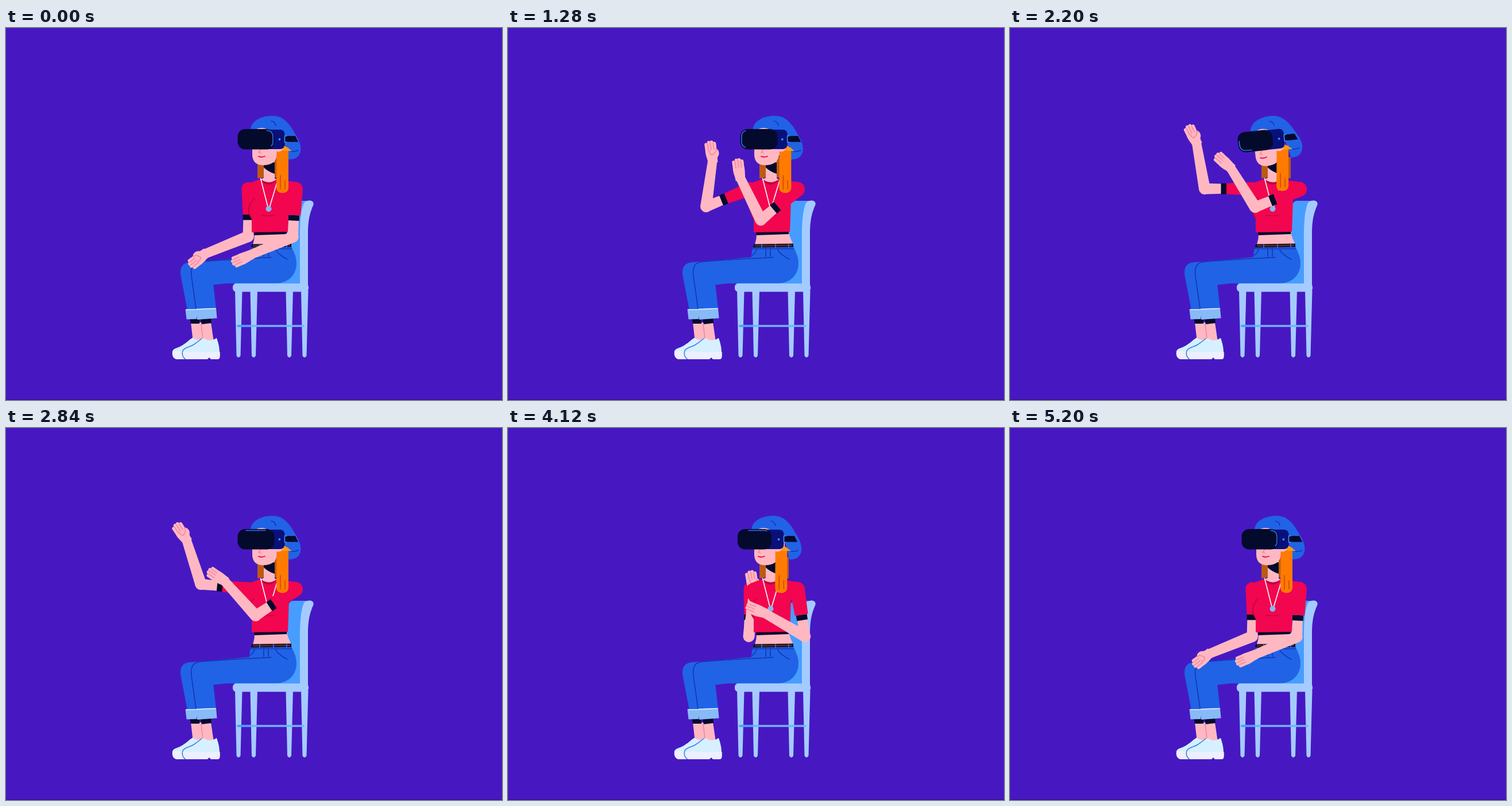
An HTML page that plays this animation: 864x648 px, repeating every 5.24 s.

```html
<!DOCTYPE html>
<html lang="en">
<head>
<meta charset="utf-8">
<title>Seated VR player</title>
<style>
  html, body { margin: 0; width: 100%; height: 100%; overflow: hidden; background: #4718c1; }
  svg { display: block; width: 100%; height: 100%; }
  .line { fill: none; stroke-width: 1.6; stroke-linecap: round; stroke-linejoin: round; }
  .skin { fill: #ffb8c2; }
  .ink { fill: #040a2c; }
  .red { fill: #f2064f; }
  .denim { fill: #2163e6; }
  .wood { fill: #a4cbff; }
  .upperShoe { fill: #d6f0ff; }
  .sole { fill: #edf0ff; }
  .seam { stroke: #1237b4; }
  .crease { stroke: #f9829c; }
  .fold { stroke: #c0053f; }
  .finger { fill: none; stroke: #ffb8c2; stroke-width: 5.8; stroke-linecap: round; }
</style>
</head>
<body>
<svg viewBox="0 0 864 648">
  <defs>
    <g id="palm">
      <path class="skin" d="M-5-8.500C4-8.500 8-11 16-10.500L20 9C13 11 5 8.500-5 8.500Z"/>
      <path class="finger" d="M15-7.500 28-7.500M15-2.500 31-2.500M15 2.500 31 2.500M15 6.500 28 7"/>
      <path class="line crease" d="M17-5 29-5M18 0H31M18 4.700H29"/>
    </g>
    <g id="upper">
      <path class="skin" d="M48-8.500 83-9.500V9.500L48 8.500Z"/>
      <rect class="ink" x="45" y="-9.500" width="9.500" height="19"/>
    </g>
    <g id="lower">
      <circle class="skin" r="10"/>
      <path class="skin" d="M0-10 84-8V8L0 10Z"/>
    </g>
    <path id="leg" class="wood" d="M-6-117H6.500L3.500-3Q0 3-3.500-3Z"/>
  </defs>

  <rect width="864" height="648" fill="#4718c1"/>
  <rect y="647" width="864" height="1" fill="#2e1180"/>

  <g id="chair">
    <path fill="#479dff" d="M488 318Q492 301 500 301H524L516 447H398V440L480 430Z"/>
    <path class="wood" d="M512 450V365C512 335 514 318 518 307Q520 300 530 300.500Q537 302 535.500 308C529 322 526 336 526 358V450Z"/>
    <use href="#leg" x="405" y="574"/>
    <use href="#leg" x="431.500" y="574"/>
    <use href="#leg" x="493.500" y="574"/>
    <use href="#leg" x="520" y="574"/>
    <path class="line" stroke="#72b3fd" style="stroke-width:3.600" d="M404 519H518"/>
    <path class="line" stroke="#479dff" style="stroke-width:3.600" d="M404 519H425"/>
    <rect class="wood" x="395" y="445" width="132" height="14.500" rx="6"/>
  </g>

  <g id="legs">
    <path class="skin" d="M322 513H340L344 548H326ZM340 513H357L362 547H344Z"/>
    <path class="line crease" d="M340 516 343 541"/>
    <path class="ink" d="M320 506H337V515H322ZM338 505 357 504 358 514 341 516Z"/>
    <path class="denim" d="M316 492 304.500 432Q301 409 321 408L424 400V440L340 450 334 492Z"/>
    <path class="denim" d="M332 490 323 432Q320 411 336 408L424 399Q424 388 428 380H497C501 390 506 397 506 410C506 430 492 444 472 444.500L361 445 366 490Z"/>
    <path class="line seam" d="M331 489 323 432Q320 410 336 407.500C370 404 420 402 462 399.500M427 384.500H497M433 386Q430 394 425 396M449 384V398M457 384V398M470 386Q472 393 490 403"/>
    <path fill="#88baf8" d="M312.500 490H332V507L314.500 507.500ZM330.500 489 366 488 367.500 505.500 333 508Z"/>
    <path class="line" stroke="#e4f2ff" d="M314 490.500H330M332 490 365 488.500"/>
    <path class="upperShoe" d="M290 566C289 558 298 558 305 554C314 549 319 543 325 539.500Q334 546 342 541V568Z"/>
    <path class="sole" d="M290 563H330V577H296Q288 574 290 563Z"/>
    <path class="upperShoe" d="M308 566C308 559 318 557 325 553C334 548 338 543 344 540Q354 548 367 540C370 549 372 556 372 566Z"/>
    <path class="sole" d="M308 564H372.500Q374 577 369 577H357L354 574 351 577H313Q306 574 308 564Z"/>
    <path class="line" stroke="#3d83e6" d="M312 576.500Q305 571 308 562C312 556 320 556 327 551.500Q335 546 341 541"/>
  </g>

  <g id="farArm">
    <use href="#upper"/>
    <path class="red" d="M0-11.500 45-9.500V9.500L0 11.500A11.500 11.500 0 0 1 0-11.500Z"/>
    <g class="fore">
      <use href="#lower"/>
      <g class="hand">
        <path class="skin" d="M2 7C6 14 15 14 18 10L18 2H2Z"/>
        <use href="#palm"/>
        <path class="line crease" d="M18 8C15 11 11 5 9 0M9 0C11-4 14-4 17-3"/>
      </g>
    </g>
  </g>

  <g id="torso">
    <path class="skin" d="M434 357H489L492 366 497 377H430Q433 368 433 360Z"/>
    <path class="ink" d="M428 376.500 497 375.500V381.500L427 382.500Z"/>
    <path fill="#62260f" d="M430 378 495 377V380L430 381Z"/>
    <path class="line" stroke="#2163e6" style="stroke-width:2" d="M442 377V383M466 377V383M489 377V382"/>
    <path fill="#bd5a12" d="M438 225H451V260L438 262ZM466 225H489V262L466 260Z"/>
    <path class="skin" d="M449 230H468V262L474 265Q459 276 443 264L449 261Z"/>
    <path class="ink" d="M449 234H468V254Q456 250 449 243Z"/>
    <path class="ink" d="M432 354H489V359L433 361Z"/>
    <path class="red" d="M443 263Q457 274 471 264L500 267.500Q512 271 508 283L493 300 491 355 428 356V333Q418 318 423 303L413 290Q412 275 424 270Z"/>
    <path fill="#b9053f" d="M445 264.500Q457 273 471 265L469 268Q457 277 447 269Z"/>
    <path class="line fold" d="M432 297C424 306 418 318 428 331M446 326.500Q457 328 467 326.500"/>
    <path class="line" stroke="#fff" d="M443.500 262 456 311M473 266 459.500 311"/>
    <circle cx="457.500" cy="315" r="5" fill="#84b7f2"/>
  </g>

  <g id="nearArm">
    <use href="#upper"/>
    <path class="red" d="M0-13 45-11.500V11.500L0 13A13 13 0 0 1 0-13Z"/>
    <g class="fore">
      <use href="#lower"/>
      <g class="hand"><use href="#palm"/></g>
    </g>
  </g>

  <g id="head">
    <path id="hat" class="denim" d="M426 177C428 160 446 153 465 153C484 153 495 168 504 185C511 196 516 208 512 218C508 228 500 229 492 229L480 178H456Z"/>
    <path class="skin" d="M429 200V222C430 234 437 239 448 239C461 239 470 234 472 222L482 215V196H456V177Q445 171 434 177Z"/>
    <g id="details">
      <path class="line seam" d="M462 162Q469 163 470 170M497 214.500Q504 216 509 213"/>
      <path class="line crease" d="M444 211 440 217 444 218M471 213Q477 217 481 213"/>
      <path class="line" stroke="#ea003f" style="stroke-width:1.800" d="M440 223.500Q444 226 451 223.500"/>
    </g>
  </g>
  <g id="lock">
    <path fill="#ff7a00" d="M471.500 208H492V279Q491 287.500 481 287.500Q471 286 471 279Z"/>
    <path class="line" stroke="#cd4b08" d="M478 257V281M486 266V280"/>
  </g>
  <g id="headset">
    <g id="side">
      <path fill="#ff9a14" d="M484 204 498 214H482Z"/>
      <path class="skin" d="M470 210H483Q480 217 471 215Z"/>
      <path class="ink" d="M485 188H504L509 198.500H485Z"/>
      <rect x="448" y="177" width="37.500" height="34" rx="8" fill="#08117a"/>
      <path class="line" stroke="#3f8fff" d="M489 188H485.500V199H489"/>
      <circle cx="476.500" cy="194" r="1.900" fill="#3f8fff"/>
    </g>
    <rect id="front" class="ink" y="176" height="35.500" rx="13"/>
    <rect id="glint" class="line" y="178.500" height="30" rx="10" stroke="#2c73f2" pathLength="160" stroke-dasharray="34 126"/>
  </g>
</svg>

<script>
const LOOP = 5240, STEP = 40;
const UPPER = 83, FORE = 82, FAR_WRIST = -16;
const $ = id => document.getElementById(id);

// time, far arm [upper, fore], near arm [upper, fore, wrist], head [turn, glint]
const pose = (at, far, near, head) => ({ at, values: [...far, ...near, ...head] });
const rest = at => pose(at, [90, 158], [93, 157, -1], [0, 55]);
const poses = [
  rest(0),
  pose(1280, [158, 278], [140, 244, 18], [-.25, -20]),
  pose(2200, [180, 260], [158, 238, -16], [.7, -36]),
  pose(2840, [185.5, 252], [146.5, 228, -15], [0, 19]),
  pose(3640, [156, 283], [95, 216, -10], [1, 33]),
  pose(4560, [78, 205], [80, 191.5, -7], [1.05, 16]),
  rest(5160),
  rest(LOOP)
];

const bump = u => u > 0 && u < 1 ? 16 * u * u * (1 - u) ** 2 : 0;

function slope(k, c) {
  const a = poses[k], b = poses[k + 1];
  return a && b ? (b.values[c] - a.values[c]) / (b.at - a.at) : 0;
}

// harmonic mean of both slopes: smooth, without overshoot
function tangent(k, c) {
  const p = slope(k - 1, c), q = slope(k, c);
  return p * q > 0 ? 2 * p * q / (p + q) : 0;
}

function sample(t) {
  const i = poses.findLastIndex(p => p.at <= t);
  const a = poses[i], b = poses[i + 1], span = b.at - a.at;
  const u = (t - a.at) / span, ease = u * u * (3 - 2 * u);
  const values = a.values.map((v, c) => v + (b.values[c] - v) * ease
    + span * u * (1 - u) * ((1 - u) * tangent(i, c) - u * tangent(i + 1, c)));

  // the elbow folds in proportion to how far the upper arm swings
  for (const c of [0, 2]) {
    const fold = Math.abs(b.values[c] - a.values[c]) * bump(u);
    values[c] -= .22 * fold;
    values[c + 1] += .32 * fold;
  }
  return values;
}

function place(el, x, y, angle = 0) {
  el.setAttribute('transform', `translate(${x} ${y}) rotate(${angle})`);
}

function poseArm(id, x, y, upper, fore, wrist) {
  const arm = $(id);
  place(arm, x, y, upper);
  place(arm.querySelector('.fore'), UPPER, 0, fore - upper);
  place(arm.querySelector('.hand'), FORE, 0, wrist);
}

function poseHead(turn, tilt, glint) {
  for (const id of ['head', 'headset']) {
    $(id).setAttribute('transform', `rotate(${tilt} 460 235)`);
  }
  place($('hat'), -2 * turn, 0);
  place($('details'), -4 * turn, 0);
  place($('side'), -4.8 * turn, 0);
  place($('lock'), .5 * tilt - 5.5 * turn, .6 * tilt);
  const x = 403.5 - 3.5 * turn, width = 64 - 4.5 * turn;
  $('front').setAttribute('x', x);
  $('front').setAttribute('width', width);
  $('glint').setAttribute('x', x + 2.5);
  $('glint').setAttribute('width', width - 5);
  $('glint').setAttribute('stroke-dashoffset', 17 - glint);
}

const start = performance.now();
function draw() {
  const t = Math.floor((performance.now() - start) % LOOP / STEP) * STEP;
  const [farUpper, farFore, nearUpper, nearFore, nearWrist, turn, glint] = sample(t);
  poseArm('farArm', 422, 280, farUpper, farFore, FAR_WRIST);
  poseArm('nearArm', 504, 281, nearUpper, nearFore, nearWrist);
  poseHead(turn, -6 * bump((t - 1530) / 1340), glint);
  requestAnimationFrame(draw);
}
draw();
</script>
</body>
</html>
```
